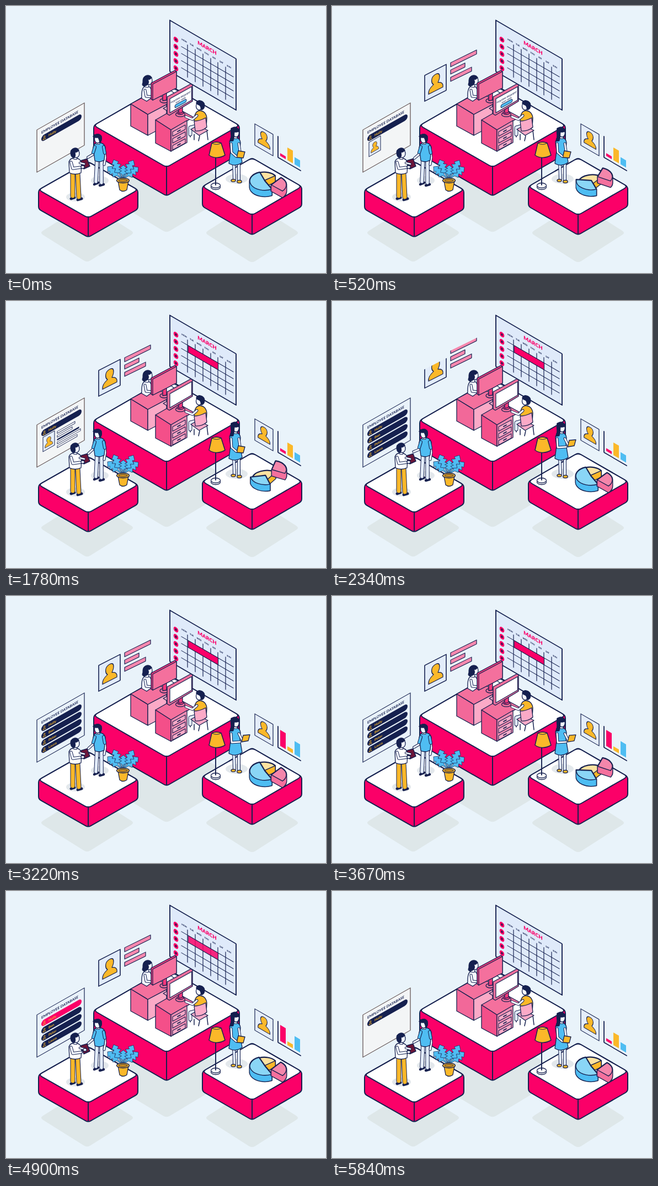
Recreate the animation shown at these times as an HTML page. Size 580 px wide and 485 px high, loop 5.87 s.

```html
<!DOCTYPE html>
<html lang="en">
<head>
<meta charset="utf-8">
<title>Employee database</title>
<style>
html, body { margin: 0; height: 100%; overflow: hidden; background: #e9f3fa; }
svg { display: block; width: 100vw; height: 100vh; stroke: #15204f; stroke-linejoin: round; stroke-linecap: round; }
text { font-family: Lato, "Open Sans", sans-serif; font-weight: 700; stroke: none; fill: #15204f; }
.flat { stroke: none; }
</style>
</head>
<body>
<svg id="stage" viewBox="0 0 580 485"></svg>
<script>
const LOOP = 5870;
const NAVY = '#15204f', PINK = '#fb0068', ROSE = '#f4709d', PALE = '#fbaac7',
      BLUE = '#4fbdf2', GOLD = '#fbb829', SKIN = '#f4f8ff', ICE = '#e3ecfa';

// Drawing helpers
const path = (d, fill = 'none', w = 1.3, more = '') =>
  `<path d="${d}" fill="${fill}" stroke-width="${w}" ${more}/>`;
const poly = (pts, fill, w, more) => path(`M${pts}Z`, fill, w, more);
const oval = (x, y, rx, ry, fill, more = '') =>
  `<ellipse cx="${x}" cy="${y}" rx="${rx}" ry="${ry}" fill="${fill}" stroke-width="1.3" ${more}/>`;
const rect = (x, y, w, h, fill, sw = 1.2, more = '') =>
  `<rect x="${x}" y="${y}" width="${w}" height="${h}" fill="${fill}" stroke-width="${sw}" ${more}/>`;
const text = (x, y, size, str, more = '') =>
  `<text x="${x}" y="${y}" font-size="${size}" ${more}>${str}</text>`;
const limb = (d, color, w) => path(d, 'none', w + 2) + path(d, 'none', w, `stroke="${color}"`);
const plane = (x, y, slope, body) => `<g transform="matrix(1,${slope},0,1,${x},${y})">${body}</g>`;
const group = (id, body) => `<g id="${id}">${body}</g>`;
const clip = (id, x, y, w, h) => `<clipPath id="${id}"><rect x="${x}" y="${y}" width="${w}" height="${h}"/></clipPath>`;
const FLAT = 'class="flat"';

function rounded(pts, r) {
  return pts.map((p, i) => {
    const toward = q => {
      const k = r / Math.hypot(q[0] - p[0], q[1] - p[1]);
      return [p[0] + (q[0] - p[0]) * k, p[1] + (q[1] - p[1]) * k];
    };
    const n = pts.length;
    return `${i ? 'L' : 'M'}${toward(pts[(i + n - 1) % n])}Q${p} ${toward(pts[(i + 1) % n])}`;
  }).join('') + 'Z';
}

function platform(x, y, rx, ry, h) {
  const l = [x - rx, y], t = [x, y - ry], r = [x + rx, y], b = [x, y + ry];
  const low = p => [p[0], p[1] + h];
  return path(rounded([l, t, r, low(r), low(b), low(l)], 5), PINK, 2)
    + path(rounded([l, t, r, b], 7), '#fff', 2)
    + path(`M${x} ${y + ry - 2}V${y + ry + h - 2}`, 'none', 2);
}
const shadow = (x, y, rx, ry) =>
  path(rounded([[x - rx, y], [x, y - ry], [x + rx, y], [x, y + ry]], 7), '#dee7e9', 0, FLAT);

// Bust silhouette in a 40 x 47 frame
const bust = s => `<g transform="scale(${s})">` + path(
  'M7 38C6 30 11 27 16 25C11 19 11 8 20 8C29 8 28 19 24 25C29 27 34 30 33 38Z', GOLD, 1.3) + '</g>';

// Leaf with notched edges, growing from the pot to its tip
function leaf(x, y, w) {
  const bx = 211, by = 315, dx = x - bx, dy = y - by, len = Math.hypot(dx, dy);
  const at = (k, off) => [bx + dx * k - dy / len * off, by + dy * k + dx / len * off];
  const edge = s => [[.35, .2], [.45, .9], [.58, .35], [.66, 1], [.76, .35], [.82, .75]]
    .map(([k, off]) => at(k, off * w * s));
  return poly([[bx, by], ...edge(1), [x, y], ...edge(-1).reverse()].join(' '), BLUE, .7);
}

// Wall panels
function calendar() {
  const cols = [32, 46, 60, 74, 87, 101], lines = [35.5, 48, 61, 74];
  const days = ['MON', 'TUE', 'WED', 'THU', 'FRI', 'SAT', 'SUN'];
  return plane(297, 26, .583,
    rect(0, 0, 120, 93, '#dfeafa', 1.9)
    + text(67.500, 14, 9.200, 'MARCH', `text-anchor="middle" style="fill:${PINK};font-weight:900"`)
    + days.map((d, i) => text(26 + i * 13.5, 23, 3.7, d, 'text-anchor="middle" style="font-weight:900"')).join('')
    + [0, 1, 2, 3, 4].map(i => oval(11, 28.6 + i * 13, 4.3, 4.6, PINK, FLAT)
        + oval(11, 28.6 + i * 13, 1.5, 2, NAVY, FLAT)).join('')
    + path(cols.map(x => `M${x} 26V85`).join('') + lines.map(y => `M21 ${y}H115`).join(''), 'none', 1.2)
    + group('leave', rect(33, 35.5, 54.5, 12.5, PINK, 1.2)));
}

const names = ['Holly', 'Ben', 'Peter', 'Laura'];
const infoLines = [[33, 32, 3.6, '#fff'], [40, 27, 3.6, '#fff'], [47, 39, 2, NAVY], [52, 42, 3.6, '#fff'], [59, 36, 3.6, '#fff']];

function database() {
  const row = (name, i) => `<g id="row${i}" transform="translate(0,${i * 13.3})">`
    + rect(8, 16, 73, 11, NAVY, 0, 'rx="5.5" class="flat"')
    + `<g stroke="${GOLD}">` + oval(13.5, 20, 1.3, 1.4, 'none', 'style="stroke-width:.7"')
    + path('M11 24.4Q13.5 19.8 16 24.4Z', 'none', .7) + '</g>'
    + text(21, 24, 6, name, `style="fill:${GOLD}"`) + '</g>';
  return plane(56, 225, -.57,
    rect(0, 0, 86, 77, '#f3f5f6', 1.2, 'id="panel"')
    + text(8, 12, 6.4, 'EMPLOYEE DATABASE')
    + names.map(row).join('')
    + group('profile', rect(11, 29, 21, 26, '#e6effb', 1)
      + `<g transform="translate(11,30)">${bust(.53)}</g>`
      + infoLines.map(([y, w, h, c], i) => rect(37, y, w, h, c, .9, `id="info${i}"`)).join('')));
}

const report = () => plane(168, 126, -.51,
    clip('cardClip', -3, -2, 46, 51)
    + `<g clip-path="url(#cardClip)">` + group('card', rect(0, 0, 39, 47, '#e2ecfa', 1.6) + bust(1)) + '</g>')
  + plane(215, 103, -.49,
    clip('barClip', -3, -13, 56, 49)
    + `<g clip-path="url(#barClip)">` + group('bars',
      [47, 26, 38].map((w, i) => rect(0, i * 13.3, w, 7.300, '#f788ae', 1.2)).join('')) + '</g>');

// Office furniture and staff
function office() {
  const drawer = y => poly(`302 ${y + 2.5} 325 ${y - 10} 325 ${y - 2} 302 ${y + 10.5}`, PALE, 1.1)
    + path(`M311 ${y + 2}l5 -2.8`, 'none', 1.8);
  return poly('226 178 266 156 300 174 257 197', ROSE)
    + poly('226 178 257 197 257 235 226 218', '#f26899')
    + poly('257 197 291 179 291 217 257 235', PALE)
    // woman at the back desk
    + path('M246 168C245 152 248 146 254 145Q262 145 264 154L265 166L255 173Z', SKIN)
    + limb('M252 153L254 164L266 165', SKIN, 3)
    + path('M251 140V147L258 148L259 143', SKIN, 1)
    + oval(259.5, 135.5, 5.5, 7.5, SKIN)
    + path('M264 130Q262 125 255 126Q247 128 248 139Q245 145 251 146L257 143Q260 137 257 134Q262 134 264 130Z', NAVY, 1)
    // back monitor
    + oval(287, 172, 8, 4, ROSE) + poly('284 160 291 157 291 171 284 172', '#f5387c')
    + poly('263 140 306 117 309 119 309 149 266 171 263 169', '#f5387c', 1.4)
    + poly('266 142 309 119 309 149 266 171', ROSE, 1.2)
    + poly('299 154 305 151 313 155 306 159', '#fff')
    // front desk
    + poly('271 207 309 185 340 202 299 225', ROSE)
    + poly('271 207 299 225 299 264 271 249', '#f44f89')
    + poly('299 225 328 208 328 248 299 264', '#f88db2')
    + [226, 238.5, 251].map(drawer).join('')
    + poly('285 186 294 181 302 186 293 191', PALE)
    // front monitor
    + oval(316, 197, 8.5, 4.2, ROSE) + oval(316, 194, 6, 3, '#f5387c')
    + poly('313 184 320 181 320 193 313 195', '#f5387c')
    + poly('292 165 335 141.500 338 143.500 338 173 296 198.500 292 196', ROSE, 1.4)
    + poly('297 168.500 336.500 146.500 336.500 171 297 194', '#fff', 1.2)
    + plane(297, 168, -.55, group('request',
      text(19.700, 10, 4, 'HOLIDAY REQUEST', 'text-anchor="middle"')
      + text(19.700, 15, 3.700, 'from: Holly', 'text-anchor="middle"')
      + rect(9, 17, 21, 5.500, BLUE, .9, 'rx="2.700"')))
    // man on the chair
    + path('M341 233V243M334 231V238M364 226L366 243M351 236L349 245', 'none', 1.5)
    + limb('M345 218L334 221L334 233', ICE, 5)
    + poly('335 224 348 217 366 226 350 235', PALE)
    + path('M341 206Q342 191 351 190Q363 191 364 204L363 221L345 224Z', GOLD)
    + limb('M346 199L338 206L326 201', SKIN, 3)
    + path('M341 209Q351 209 362 203L364 220Q355 228 343 227Z', PALE)
    + oval(350, 182, 5.500, 7, SKIN)
    + path('M345 177Q344 172 351 171.500Q361 173 360 182Q359 189 353 189Q354 183 350 180Q348 180 345 177Z', NAVY, 1);
}

const plant = () => [[184, 292, 9], [240, 293, 9], [195, 279, 9], [231, 280, 9], [213, 289, 8]]
    .map(l => leaf(...l)).join('')
  + path('M203 318L206 334Q212 339 219 334L222 318Z', GOLD)
  + oval(212, 317, 11.5, 4.5, GOLD) + oval(212, 317, 8, 2.4, '#c98a1c', 'style="stroke-width:.8"');

const colleagues = () => oval(170, 317, 16, 8, '#e3e8ec', FLAT) + oval(126, 347, 17, 8, '#e3e8ec', FLAT)
  // man in blue
  + path('M160 324l7 -3M170 326l7 -2', 'none', 4.5)
  + limb('M165 280L163 319M173 280L173 321', ICE, 5.5)
  + limb('M178 258L180 275L178 288', SKIN, 3)
  + path('M158 257Q159 249 167 248Q178 248 180 257L178 280Q169 285 161 281Z', BLUE)
  + limb('M177 256L179 267', BLUE, 4)
  + group('gesture', '')
  + path('M163 246V251H170V246', SKIN, 1)
  + oval(166, 242, 5.500, 7, SKIN)
  + path('M158 237L160 234Q169 230 173 236Q175 245 170 249Q169 243 167 239Q161 240 158 237Z', NAVY, 1)
  // man with the tablet
  + path('M118 350l6 -2M130 352l7 -2', 'none', 4.800)
  + limb('M121 305L121 345M130 305L132 347', GOLD, 7)
  + path('M114 283Q116 276 125 276Q136 277 137 286L136 303Q125 308 115 303Z', '#fff')
  + poly('135 281 147 277.500 152 291 141 296', '#6b1538', 1.4)
  + limb('M118 284L121 295L136 293', SKIN, 3.500)
  + limb('M134 285L142 287', SKIN, 2.5)
  + oval(139, 292.500, 3.200, 2.600, SKIN, 'id="tap"')
  + path('M122 271V278L128 279L129 274', SKIN, 1)
  + oval(127, 268, 6, 7.500, SKIN)
  + path('M132 262Q130 257 124 258Q116 260 117 268Q118 276 124 276Q127 272 125 266Q130 266 132 262Z', NAVY, 1);

const lamp = () => oval(380, 329, 8.5, 4.5, '#fff') + oval(380, 326, 8.5, 4.5, '#fff')
  + path('M380 276V325', 'none', 1.9)
  + path('M373 249L368 271Q381 280 397 271L390 249Q381 245 373 249Z', GOLD, 1.5)
  + path('M373 249Q382 254 390 249', 'none', 1);

const presenter = () => oval(418, 314, 20, 9, '#e3e8ec', FLAT)
  + limb('M413 284L414 314M422 284L422 316', ICE, 4)
  + oval(412, 317, 4, 2.4, GOLD) + oval(423, 319, 4.2, 2.6, GOLD)
  + path('M408 222Q417 217 422 224Q424 232 420 240L407 247Q405 242 408 238Z', NAVY, 1)
  + path('M405 247Q408 239 416 239Q424 240 425 248L424 260L428 284Q416 293 404 286L407 263Z', BLUE)
  + path('M413 235V241H419V235', SKIN, 1)
  + oval(417, 231, 5.3, 7, SKIN)
  + path('M423 227Q421 219 413 220Q405 223 408 235Q408 242 405 246L412 245Q414 236 414 229Q420 230 423 227Z', NAVY, 1)
  + group('tablet', '');

// Angles in degrees; each slice: centre x, centre y, radius, start, end
const slices = [
  { top: '#fde2a0', side: GOLD, rest: [468, 317, 24, 250, 325], spread: [473, 325, 27, 185, 305] },
  { top: '#8ad6f6', side: BLUE, rest: [469, 318, 27, 62, 250], spread: [470, 317, 27, 72, 168] },
  { top: '#f486ab', side: '#f4709d', rest: [481, 325, 27, -50, 42], spread: [482, 306, 26, -75, 25] }
];

function slice({ top, side, rest, spread }, k) {
  const [cx, cy, r, a, b] = rest.map((v, i) => mix(v, spread[i], k));
  const at = deg => [cx + r * Math.cos(deg * Math.PI / 180), cy + r * .62 * Math.sin(deg * Math.PI / 180)];
  const face = dy => {
    const [x1, y1] = at(a), [x2, y2] = at(b);
    return `M${cx} ${cy + dy}L${x1} ${y1 + dy}A${r} ${r * .62} 0 ${b - a > 180 ? 1 : 0} 1 ${x2} ${y2 + dy}Z`;
  };
  let body = '';
  for (let dy = 0; dy <= 11; dy++) body += face(dy);
  return path(body, side, 3) + path(body, side, .2, `stroke="${side}"`) + path(face(0), top, 1.4);
}

const chartBars = [[4, 5, 29, PINK], [17, 23, 7, GOLD], [30, 13, 24, BLUE]];

stage.innerHTML = shadow(291, 333, 131, 79) + shadow(147, 412, 86, 54) + shadow(446, 412, 86, 55)
  + calendar() + report() + platform(291, 217, 132, 76, 52) + office()
  + database() + platform(149, 334, 90, 51, 35) + colleagues() + plant()
  + platform(446, 328, 90, 52, 36) + lamp() + presenter() + group('pie', '')
  + plane(451, 214, .58, rect(0, 0, 33, 39, '#e4edfa', 1.2) + `<g transform="translate(0,-1)">${bust(.83)}</g>`)
  + plane(493, 275, .585, chartBars.map((b, i) => rect(b[0], 0, 10, 0, b[3], 0, `id="bar${i}" class="flat"`)).join('')
    + path('M0 -38V0H41', 'none', 1.8));

// Motion
const $ = id => document.getElementById(id);
const set = (id, key, value) => $(id).setAttribute(key, value);
const mix = (a, b, k) => a + (b - a) * k;
function ease(t, a, b) {
  const k = Math.min(1, Math.max(0, (t - a) / (b - a)));
  return k * k * (3 - 2 * k);
}
const pulse = (t, a, b, c, d) => ease(t, a, b) - ease(t, c, d);

// Enters from above, is replaced upwards twice, leaves downwards
function slide(t) {
  if (t < 2235) return -52 * (1 - ease(t, 150, 450));
  if (t < 2535) return -52 * ease(t, 2235, 2535);
  if (t < 4150) return 52 * (1 - ease(t, 2535, 2835));
  if (t < 4450) return -52 * ease(t, 4150, 4450);
  return 52 * (1 - ease(t, 4450, 4750)) + 52 * ease(t, 5450, 5750);
}

function draw(t) {
  const shift = `translate(0,${slide(t)})`;
  set('card', 'transform', shift);
  set('bars', 'transform', shift);

  set('request', 'opacity', 1 - ease(t, 1400, 1550));
  set('leave', 'opacity', pulse(t, 1500, 1700, 4840, 5080));

  set('profile', 'opacity', pulse(t, 250, 500, 1850, 2000));
  infoLines.forEach(([, w], i) => {
    const k = ease(t, 620 + i * 90, 800 + i * 90);
    set('info' + i, 'width', w * k);
    set('info' + i, 'opacity', k > 0 ? 1 : 0);
  });
  for (let i = 1; i < 4; i++) set('row' + i, 'opacity', pulse(t, 1900 + i * 80, 2050 + i * 80, 5060, 5280));
  $('row0').firstChild.setAttribute('fill', t > 4820 && t < 5120 ? PINK : NAVY);
  const list = pulse(t, 1850, 2100, 5060, 5280);
  set('panel', 'stroke', list > .5 ? NAVY : '#5b4a4a');
  set('panel', 'fill', list > .5 ? '#e9f2fa' : '#f3f5f6');

  const spread = pulse(t, 100, 700, 1750, 2200) + pulse(t, 3200, 3850, 4450, 4960);
  $('pie').innerHTML = slices.map(s => slice(s, spread)).join('');

  const grown = pulse(t, 2350, 2880, 5420, 5800);
  chartBars.forEach(([, low, high], i) => {
    const h = mix(low, high, grown);
    set('bar' + i, 'y', -5 - h);
    set('bar' + i, 'height', h);
  });

  const lift = pulse(t, 1850, 2250, 3650, 4050), x = 9 * lift, y = -10 * lift;
  $('tablet').innerHTML = limb(`M422 250L${424 + x * .4} ${263 + y * .2}L${421 + x} ${271 + y}`, SKIN, 2.8)
    + poly(`${421 + x} ${263 + y} ${433 + x} ${265 + y - lift * 3} ${430 + x} ${276 + y - lift * 3} ${418 + x} ${275 + y}`, GOLD)
    + limb(`M408 250L409 266L${417 + x * .8} ${273 + y * .8}`, SKIN, 2.8);

  const sway = Math.sin(t / LOOP * Math.PI * 8);
  $('gesture').innerHTML = limb(`M161 258L157 270L${148.5 + sway} ${275 + sway * 2}`, SKIN, 3)
    + limb('M161 256L158 266', BLUE, 4);
  const tap = pulse(t, 4750, 4880, 4950, 5100);
  set('tap', 'transform', `translate(${tap * 4},${tap * -4})`);
}

function tick() {
  draw(performance.now() % LOOP);
  requestAnimationFrame(tick);
}
tick();
</script>
</body>
</html>
```
